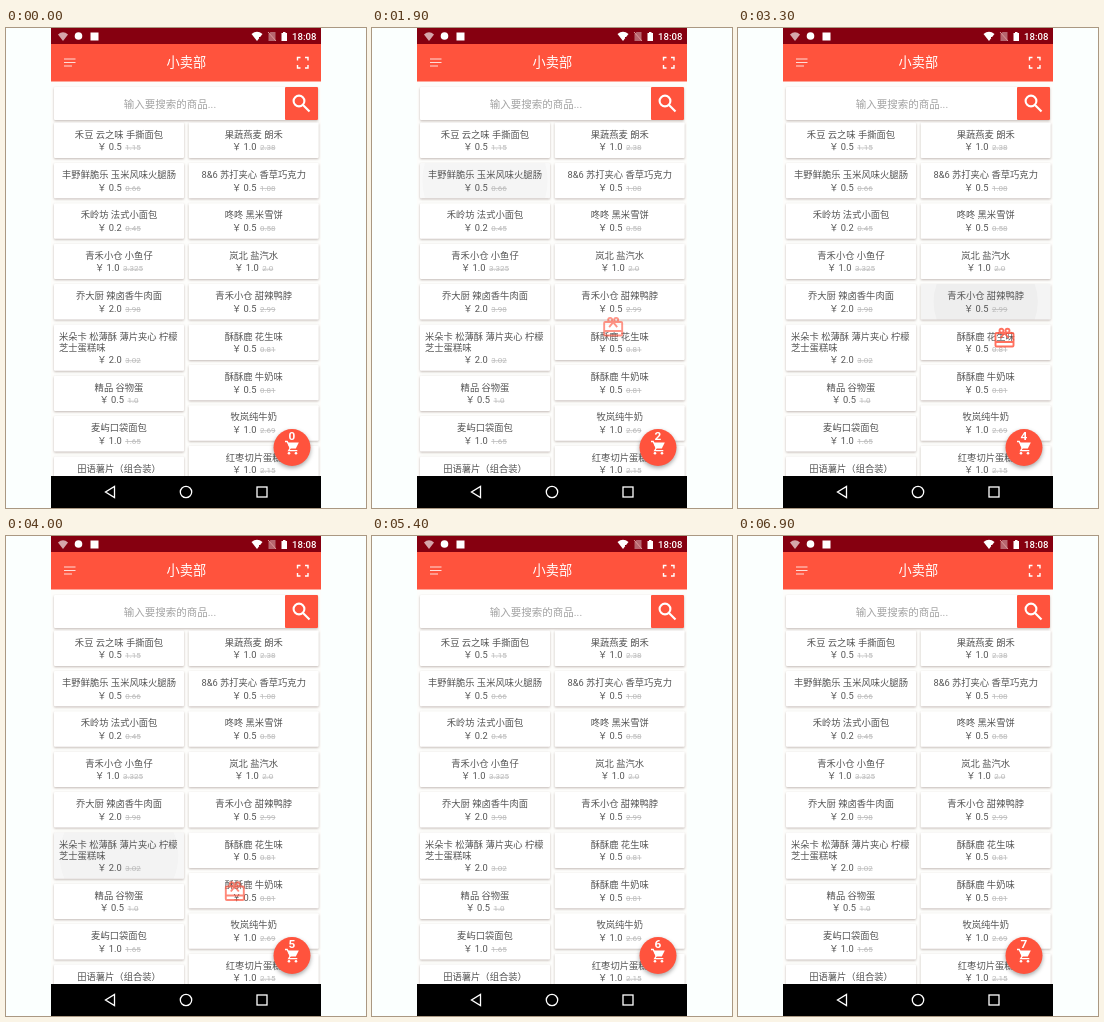
Recreate the animation shown at these times as an HTML page. Size 360x480 px, loop 7 s.

```html
<!DOCTYPE html>
<html lang="zh-CN">
<head>
<meta charset="utf-8">
<title>小卖部</title>
<style>
  html, body { margin: 0; width: 100%; height: 100%; overflow: hidden; background: #fbfffe; }
  svg { display: block; }
  text { font-family: Roboto, "Noto Sans CJK SC", "Noto Sans CJK JP", "Noto Sans CJK", sans-serif; }
  .card text { font-size: 9.3px; fill: #555; }
  .card .old { font-size: 8px; fill: #bbb; text-decoration: line-through; }
  .paper { fill: #fff; filter: drop-shadow(0 1px 1px rgba(70, 40, 30, .32)); }
  .raised { fill: #fff; filter: drop-shadow(0 3px 3px rgba(0, 0, 0, .38)); }
  .red { fill: #ff533d; }
  .line { fill: none; stroke: #fff; }
  .mid { text-anchor: middle; }
</style>
</head>
<body>
<svg id="stage" width="360" height="480" viewBox="0 0 360 480">
  <rect x="45" width="270" height="480" fill="#fdfdfb"/>

  <g id="list"></g>

  <rect class="paper" x="48" y="59" width="264" height="33" rx="1"/>
  <rect class="red" x="279" y="59" width="33" height="33" rx="1"/>
  <text class="mid" x="164" y="79.8" font-size="10.5" fill="#a3a3a3">输入要搜索的商品...</text>
  <g class="line" stroke-width="2.1">
    <circle cx="293" cy="73" r="5.4"/>
    <path d="M297 77L303.5 83.5"/>
  </g>

  <rect class="red" x="45" y="16" width="270" height="37.5"/>
  <text class="mid" x="180.3" y="39.3" font-size="13.2" fill="#fff">小卖部</text>
  <path class="line" opacity=".8" d="M58 31h11.5M58 34.5h11.5M58 38h8"/>
  <path class="line" stroke-width="1.4" d="M291.5 32.5v-3h3M299 29.5h3v3M302 37v3h-3M294.500 40h-3v-3"/>

  <rect x="45" width="270" height="16" fill="#860010"/>
  <g fill="#fff">
    <path opacity=".65" d="M52 6.500q5-4.500 10 0L57 13z"/>
    <circle cx="72.500" cy="8" r="3.8"/>
    <rect x="84.500" y="4.500" width="8" height="8"/>
    <path d="M245.500 6q5.500-4.500 11 0L251 13z"/>
    <path opacity=".4" d="M262.500 6l2-2h5v9h-7z"/>
    <path d="M275.500 5h1.500v-1h2.500v1h1.500v8h-5.500z"/>
    <text x="286" y="12" font-size="9.600" font-weight="500">18:08</text>
  </g>
  <path d="M253 9l4 4M257 9l-4 4" stroke="#860010"/>
  <path d="M262 4l8 9" stroke="#d99"/>

  <g id="gift" fill="none" stroke="#ff533d" stroke-width="1.9">
    <rect x="-9" y="-4.5" width="18" height="13.500" rx="1"/>
    <path d="M-9 4.500H9M0-4.500l-4 5M0-4.500l4 5"/>
    <circle cx="-3" cy="-6.700" r="2"/>
    <circle cx="3" cy="-6.700" r="2"/>
  </g>

  <circle class="red" cx="286" cy="419.500" r="18.500" style="filter:drop-shadow(0 2px 2px rgba(0,0,0,.35))"/>
  <g fill="#fff">
    <path d="M281.500 414.500h11.300l-3 6h-6z"/>
    <path class="line" stroke-width="1.3" d="M279 413.500h2.200l3 6.500-1.500 2.600h8.600"/>
    <circle cx="283" cy="425.300" r="1.300"/>
    <circle cx="290" cy="425.300" r="1.300"/>
    <text id="count" class="mid" x="286" y="412.300" font-size="11.800" font-weight="700">0</text>
  </g>

  <rect x="45" y="448" width="270" height="32" fill="#000"/>
  <g class="line" stroke-width="1.3">
    <path d="M108.500 458.500v11l-9-5.500z"/>
    <circle cx="180" cy="464" r="5.700"/>
    <rect x="251" y="459" width="10" height="10"/>
  </g>
</svg>
<script>
const LOOP = 7000, FRAME = 100, FLIGHT = 500, PRESS_LEAD = 60;
const CART = { x: 286, y: 419 };
const CARD_W = 130, CARD_H = 35.4, GAP = 5, EXTRA_LINE = 10.8;

// Each product: name (| breaks the line), price, struck-out price.
const columns = [
  { x: 48, items: [
    ['禾豆 云之味 手撕面包', '0.5', '1.15'],
    ['丰野鲜脆乐 玉米风味火腿肠', '0.5', '0.66'],
    ['禾岭坊 法式小面包', '0.2', '0.45'],
    ['青禾小仓 小鱼仔', '1.0', '3.325'],
    ['乔大厨 辣卤香牛肉面', '2.0', '3.98'],
    ['米朵卡 松薄酥 薄片夹心 柠檬|芝士蛋糕味', '2.0', '3.02'],
    ['精品 谷物蛋', '0.5', '1.0'],
    ['麦屿口袋面包', '1.0', '1.65'],
    ['田语薯片（组合装）', '1.0', '1.5']
  ] },
  { x: 182.7, items: [
    ['果蔬燕麦 朗禾', '1.0', '2.38'],
    ['8&6 苏打夹心 香草巧克力', '0.5', '1.08'],
    ['咚咚 黑米雪饼', '0.5', '0.58'],
    ['岚北 盐汽水', '1.0', '2.0'],
    ['青禾小仓 甜辣鸭脖', '0.5', '2.99'],
    ['酥酥鹿 花生味', '0.5', '0.81'],
    ['酥酥鹿 牛奶味', '0.5', '0.81'],
    ['牧岚纯牛奶', '1.0', '2.69'],
    ['红枣切片蛋糕', '1.0', '2.15']
  ] }
];

// Taps: time, column, row, and where the gift takes off.
const taps = [
  { at: 750, col: 0, row: 0, x: 113, y: 112 },
  { at: 1570, col: 0, row: 1, x: 113, y: 152 },
  { at: 2379, col: 1, row: 2, x: 247, y: 193 },
  { at: 3050, col: 1, row: 4, x: 247, y: 273 },
  { at: 3695, col: 0, row: 5, x: 113, y: 303 },
  { at: 4512, col: 1, row: 5, x: 232, y: 300 },
  { at: 5905, col: 1, row: 5, x: 247, y: 294 }
];

const $ = id => document.getElementById(id);

function make(tag, attrs, parent, text = '') {
  const node = document.createElementNS('http://www.w3.org/2000/svg', tag);
  for (const key in attrs) node.setAttribute(key, attrs[key]);
  node.textContent = text;
  return parent.appendChild(node);
}

function buildCard(x, y, [name, price, old]) {
  const lines = name.split('|');
  const height = CARD_H + (lines.length - 1) * EXTRA_LINE;
  const group = make('g', { class: 'card', transform: `translate(${x} ${y})` }, $('list'));
  const paper = make('rect', { class: 'paper', width: CARD_W, height, rx: 1 }, group);
  const ink = make('svg', { width: CARD_W, height, overflow: 'hidden', opacity: 0 }, group);
  make('rect', { width: CARD_W, height, rx: 1, opacity: .055 }, ink);
  const ripple = make('circle', { cx: CARD_W / 2, cy: height / 2, r: 0, opacity: .03 }, ink);

  const place = lines.length > 1 ? { x: 5 } : { x: CARD_W / 2, class: 'mid' };
  lines.forEach((line, i) => make('text', { ...place, y: 15.2 + i * EXTRA_LINE }, group, line));
  const label = make('text', { x: CARD_W / 2, y: height - 7.6, class: 'mid' }, group, `￥ ${price}`);
  make('tspan', { class: 'old', dx: 3.5 }, label, old);
  return { paper, ink, ripple, height };
}

const cards = columns.map(({ x, items }) => {
  let y = 94.5;
  return items.map(item => {
    const card = buildCard(x, y, item);
    y += card.height + GAP;
    return card;
  });
});

function showPress(card, age) {
  const active = age >= -PRESS_LEAD && age < 450;
  card.paper.setAttribute('class', active && age < 250 ? 'raised' : 'paper');
  card.ink.setAttribute('opacity', active ? Math.min(1, (450 - age) / 250) : 0);
  card.ripple.setAttribute('r', active ? 12 + (age + PRESS_LEAD) * .13 : 0);
}

function showGift(tap, age) {
  const flying = tap && age < FLIGHT;
  $('gift').setAttribute('visibility', flying ? 'visible' : 'hidden');
  if (!flying) return;
  const p = (1 - Math.cos(Math.PI * age / FLIGHT)) / 2;
  const x = tap.x + (CART.x - tap.x) * p;
  const y = tap.y + (CART.y - tap.y) * p * p;
  $('gift').setAttribute('transform', `translate(${x} ${y})`);
  $('gift').setAttribute('opacity', 1 - .7 * p * p);
}

function render(time) {
  cards.flat().forEach(card => showPress(card, -Infinity));
  const pressed = taps.filter(tap => time >= tap.at - PRESS_LEAD).pop();
  if (pressed) showPress(cards[pressed.col][pressed.row], time - pressed.at);

  const done = taps.filter(tap => time >= tap.at);
  const last = done[done.length - 1];
  showGift(last, last ? time - last.at : 0);
  $('count').textContent = done.length;
}

const start = performance.now();
function tick() {
  const time = (performance.now() - start) % LOOP;
  render(Math.floor(time / FRAME) * FRAME);
  requestAnimationFrame(tick);
}
tick();
</script>
</body>
</html>
```
